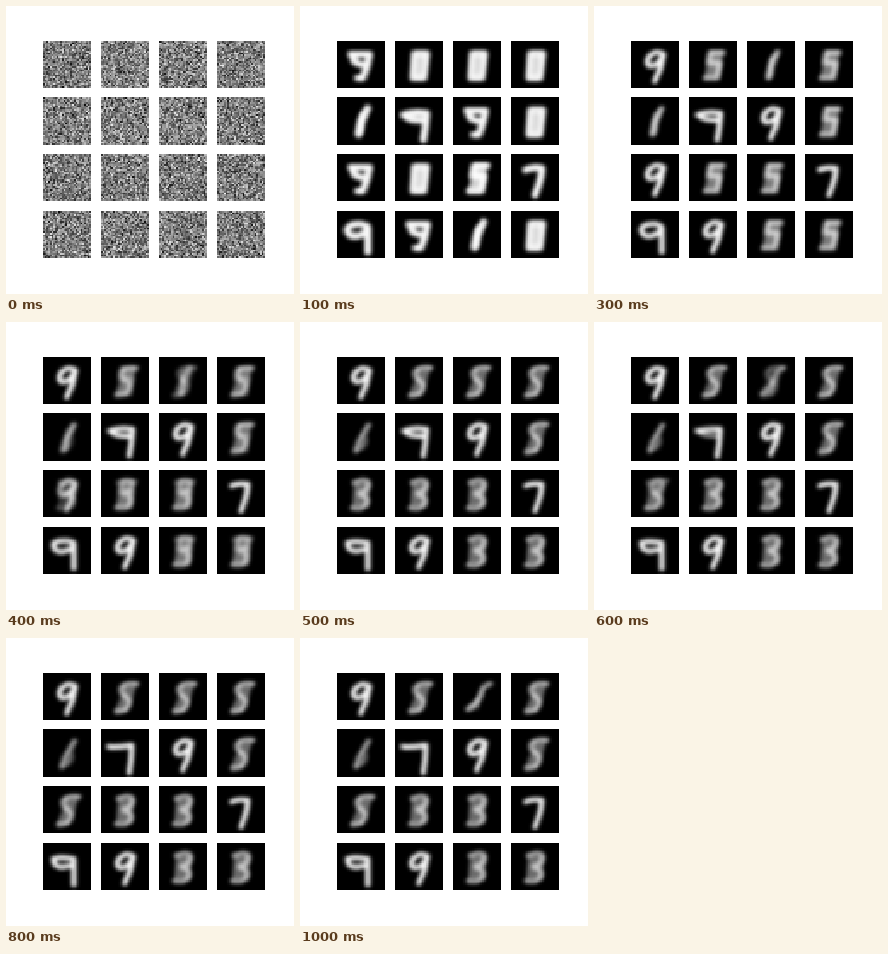
These frames come from a looping animation (288 by 288 pixels, 1.2 s). An HTML page with a canvas:

```html
<!DOCTYPE html>
<html lang="en">
<head>
<meta charset="utf-8">
<title>Generated digits</title>
<style>
  html, body { margin: 0; width: 100%; height: 100%; overflow: hidden; background: #fff; }
  canvas { display: block; width: 288px; height: 288px; }
</style>
</head>
<body>
<canvas id="stage" width="288" height="288"></canvas>
<script>
const N = 28, STEP = 100, LAST = 10, LOOP = 1200;
const KEYS = [100, 300, 500, 700, 800, 1000];

// Pen path on the 28 x 28 grid, then an optional hazy body behind it.
const shapes = {
  bar: ['M8 8H19Q18 15 15 22H12M9 8Q9 14 16 14'],
  nine: ['M19 8C15 5 9.5 8 9.5 13C10.5 17 17 14 19 8Q18 16 13.8 24'],
  wide: ['M17.5 9C12 6 5 9 6 12C8 17 16 15 18 10V24.5'],
  open: ['M6 9.5Q10 8 18 9.5V25M6 9.5C6 15 12 15 17 13'],
  hook: ['M5 10.5Q11 8 18.5 9.5Q18 17 16.5 25M6 11Q9 14 17 13.5'],
  seven: ['M4.5 10.3Q9 11 18 9.5Q18 17 16.5 25.5'],
  thin: ['M8.5 9.5Q13 7.5 18 8.5Q18 14 14 24.5'],
  blob: ['M11.5 7.5H18.5L16.8 22H10.5Z', 'M11.5 7.5H18.5L16.8 22H10.5Z'],
  eight: ['M20 7H12.5L11.5 13H18L16.5 22H9.5', 'M20 6H12L9 22H17L19 15Z'],
  ess: ['M21 6.5C14 5 9 9 13 13C19 16 17 23 9 23', 'M21 6L12 7V13L8 23H15L18 16Z'],
  three: ['M10 7.5Q18.5 4 18.5 9Q18 13 13 14Q19 16 17.5 20Q15 24 9 22.5', 'M10 7H19L18 22H9Z'],
  stroke: ['M18 6.5L14 14L12.5 22', 'M18 6L13 10L11 22H15Z'],
  six: ['M18.5 7L13 16L11 22', 'M17 11L18 17L16 21L11 23Z'],
  slide: ['M22 6.5Q17.5 7 16.5 12T8.5 21.5', 'M18 7L15 13L8 23L15 21Z']
};

// The shape at each key time; the last one stays.
const tiles = [
  'bar nine', 'blob eight ess', 'blob stroke ess slide ess slide', 'blob eight ess',
  'stroke stroke six', 'hook hook hook seven', 'bar nine', 'blob eight ess',
  'bar nine three ess', 'blob eight three', 'eight eight three', 'thin',
  'wide wide open', 'bar nine', 'stroke eight three', 'blob eight three'
].map(words => words.split(' '));

function canvas() {
  const c = document.createElement('canvas');
  c.width = c.height = N;
  return c;
}

// Strokes start fat and soft, then sharpen.
function pose(name, time) {
  const [line, haze] = shapes[name];
  const fat = Math.exp((STEP - time) / 100);
  const c = canvas(), g = c.getContext('2d');
  g.filter = `blur(${(haze ? 1 : .85) + .3 * fat}px)`;
  g.lineWidth = 2.9 + 1.2 * fat;
  g.lineCap = g.lineJoin = 'round';
  g.fillStyle = g.strokeStyle = '#fff';
  if (haze) {
    g.globalAlpha = .42 + .4 * fat;
    g.fill(new Path2D(haze));
  }
  g.globalAlpha = haze ? .62 + .3 * fat : .97;
  g.stroke(new Path2D(line));
  return c;
}

let seed = 7;
function random() {
  seed = (Math.imul(seed, 1664525) + 1013904223) >>> 0;
  return seed / 4294967296;
}

function noise() {
  const c = canvas(), g = c.getContext('2d');
  for (let i = 0; i < N * N; i++) {
    const v = 125 + 85 * (random() + random() + random() - 1.5);
    g.fillStyle = `rgb(${v}, ${v}, ${v})`;
    g.fillRect(i % N, Math.floor(i / N), 1, 1);
  }
  return c;
}

const noises = tiles.map(noise);
const poses = tiles.map(words =>
  KEYS.map((time, i) => pose(words[Math.min(i, words.length - 1)], time)));

const ctx = document.getElementById('stage').getContext('2d');
const cell = canvas();
const mix = cell.getContext('2d');
ctx.imageSmoothingEnabled = false;

function layer(image, alpha) {
  mix.globalAlpha = alpha;
  mix.drawImage(image, 0, 0);
}

function compose(tile, time) {
  mix.globalAlpha = 1;
  mix.globalCompositeOperation = 'source-over';
  mix.fillStyle = '#000';
  mix.fillRect(0, 0, N, N);
  if (time < STEP) return layer(noises[tile], 1);
  const i = Math.max(1, KEYS.findIndex(key => key >= time));
  const k = (time - KEYS[i - 1]) / (KEYS[i] - KEYS[i - 1]);
  mix.globalCompositeOperation = 'lighter';
  layer(poses[tile][i - 1], 1 - k);
  layer(poses[tile][i], k);
}

function draw(step) {
  tiles.forEach((_, n) => {
    compose(n, step * STEP);
    const x = Math.round(36.6 + 58.23 * (n % 4));
    const top = 34.56 + 56.72 * (n >> 2);
    const y = Math.round(top);
    ctx.drawImage(cell, x, y, 48, Math.round(top + 47.27) - y);
  });
}

let shown = -1;
const start = performance.now();
function tick() {
  const time = (performance.now() - start) % LOOP;
  const step = Math.min(LAST, Math.floor(time / STEP));
  if (step !== shown) draw(shown = step);
  requestAnimationFrame(tick);
}
tick();
</script>
</body>
</html>
```
